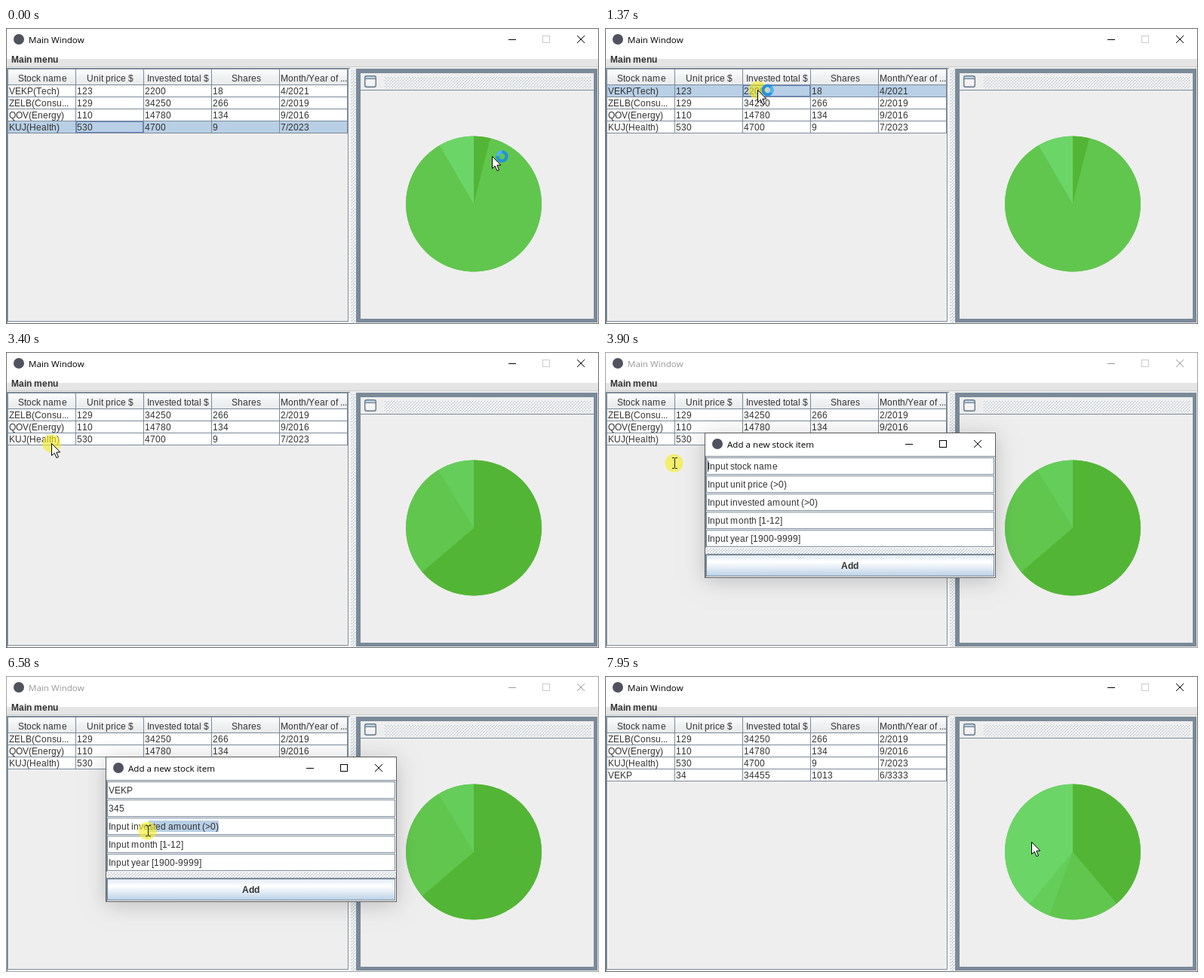
An HTML page with a canvas that plays this animation: 786 by 393 pixels, repeating every 7.99 s.

```html
<!DOCTYPE html>
<html lang="en">
<head>
<meta charset="utf-8">
<title>Main Window</title>
<style>
html, body { margin: 0; width: 100%; height: 100%; overflow: hidden; background: #eee; }
canvas { display: block; width: 786px; height: 393px; }
</style>
</head>
<body>
<canvas id="stage" width="786" height="393"></canvas>
<script>
const LOOP = 7990;
const ctx = document.getElementById('stage').getContext('2d');
const PLAIN = '12px "Liberation Sans", Arial, sans-serif';
const BOLD = 'bold ' + PLAIN;
const TITLE = '11.6px "Open Sans", "Noto Sans", sans-serif';
const LINE = '#7a8a99', PANEL = '#eeeeee', SELECT = '#b8cfe5', INK = '#333333';

const PICKED = 1040, DELETED = 2230, OPENS = 3450, CLOSES = 7130;

const stock = (name, price, total, date) =>
  ({ total, cells: [name, price, total, Math.round(total / price), date].map(String) });
const first = stock('VEKP(Tech)', 123, 2200, '4/2021');
const kept = [
  stock('ZELB(Consu...', 129, 34250, '2/2019'),
  stock('QOV(Energy)', 110, 14780, '9/2016'),
  stock('KUJ(Health)', 530, 4700, '7/2023')
];
const added = stock('VEKP', 34, 34455, '6/3333');
const headers = ['Stock name', 'Unit price $', 'Invested total $', 'Shares', 'Month/Year of ...'];
const hints = ['Input stock name', 'Input unit price (>0)', 'Input invested amount (>0)',
  'Input month [1-12]', 'Input year [1900-9999]'];

const within = (t, a, b) => t >= a && t < b;
const clamp = k => Math.min(1, Math.max(0, k));
const ease = k => (1 - Math.cos(Math.PI * k)) / 2;
const typed = (text, from, step, t) => text.slice(0, Math.floor((t - from) / step) + 1);

// Pointer story
const moves = [], presses = [];
const go = (from, to, x, y, bend = 0) => moves.push({ from, to, x, y, bend });
const press = (from, to) => presses.push([from, to]);

go(40, 260, 677, 228);
go(260, 820, 217, 104, 70);
go(840, PICKED, 202, 82);
press(PICKED, 1420);
go(1380, 1690, 312, 98);
go(1690, 1910, 281, 97);
press(2090, DELETED);
go(2530, 2850, 40, 43);
press(2850, 2950);
go(2950, 3120, 60, 121);
press(3330, 3420);
go(3420, 3680, 138, 148);
press(3700, 4090);
go(3700, 3880, 91, 147);
go(4210, 4860, 374, 184);
go(5620, 5620, 278, 180);
press(5620, 5900);
go(5640, 5860, 73, 180);
go(5920, 6390, 312, 202);
press(6420, 6860);
go(6420, 6730, 75, 207);
go(6860, 6990, 296, 284);
press(7030, CLOSES);
go(7560, 7840, 585, 210);
go(7840, 7950, 565, 220);

function pointerAt(t) {
  let x = 644, y = 170;
  for (const m of moves) {
    if (t < m.from) break;
    const k = m.to > m.from ? ease(clamp((t - m.from) / (m.to - m.from))) : 1;
    x += (m.x - x) * k;
    y += (m.y - y) * k + m.bend * Math.sin(Math.PI * k);
  }
  return [Math.round(x), Math.round(y)];
}

// Drawing helpers
function rect(x, y, w, h, fill) {
  ctx.fillStyle = fill;
  ctx.fillRect(x, y, w, h);
}

function frame(x, y, w, h, color) {
  ctx.strokeStyle = color;
  ctx.lineWidth = 1;
  ctx.strokeRect(x + 0.5, y + 0.5, w - 1, h - 1);
}

// Dark top and left edge, white bottom and right edge
function sunken(x, y, w, h) {
  frame(x, y, w, h, '#ffffff');
  rect(x, y, w, 1, LINE);
  rect(x, y, 1, h, LINE);
}

// Dark frame with a white line outside its lower right corner
function flush(x, y, w, h) {
  frame(x + 1, y + 1, w - 1, h - 1, '#ffffff');
  frame(x, y, w - 1, h - 1, LINE);
}

function disc(x, y, r, fill) {
  ctx.fillStyle = fill;
  ctx.beginPath();
  ctx.arc(x, y, r, 0, 7);
  ctx.fill();
}

function blend(y0, y1, ...colors) {
  const g = ctx.createLinearGradient(0, y0, 0, y1);
  colors.forEach((c, i) => g.addColorStop(i / (colors.length - 1), c));
  return g;
}

// Whole-pixel advances, as in hinted interface text
const advance = ch => ch === 'm' ? 11 : Math.round(ctx.measureText(ch).width);

function stopsOf(text, font = PLAIN) {
  ctx.font = font;
  const out = [0];
  for (const ch of text) out.push(out[out.length - 1] + advance(ch));
  return out;
}

function label(text, x, y, font = PLAIN) {
  const at = stopsOf(text, font);
  ctx.fillStyle = INK;
  [...text].forEach((ch, i) => ctx.fillText(ch, x + at[i], y));
}

function centered(text, cx, y, font) {
  label(text, Math.round(cx - stopsOf(text, font).pop() / 2), y, font);
}

const dots = (() => {
  const tile = document.createElement('canvas');
  tile.width = tile.height = 4;
  const c = tile.getContext('2d');
  for (const d of [0, 2]) {
    c.fillStyle = '#ffffff';
    c.fillRect(d, d, 1, 1);
    c.fillStyle = '#9aabbd';
    c.fillRect(d + 1, d + 1, 1, 1);
  }
  return ctx.createPattern(tile, 'repeat');
})();

function bumps(x, y, w, h) {
  ctx.save();
  ctx.translate(x, y);
  rect(0, 0, w, h, dots);
  ctx.restore();
}

function titleBar(x, y, w, text, active, maxColor) {
  const ink = active ? '#000000' : '#999999';
  const r = x + w, m = y + 14;
  rect(x, y, w, 30, '#ffffff');
  disc(x + 16, m, 7, '#50535f');
  ctx.font = TITLE;
  ctx.fillStyle = ink;
  ctx.fillText(text, x + 29, y + 19);
  rect(r - 119, m, 10, 1, ink);
  frame(r - 74, m - 5, 10, 10, active ? maxColor : '#cccccc');
  ctx.strokeStyle = ink;
  ctx.beginPath();
  for (const s of [-5, 5]) {
    ctx.moveTo(r - 28, m - s);
    ctx.lineTo(r - 18, m + s);
  }
  ctx.stroke();
}

// Main window
function rowsAt(t) {
  return [...(t < DELETED ? [first] : []), ...kept, ...(t >= CLOSES ? [added] : [])];
}

function table(t, rows) {
  sunken(1, 53, 455, 339);
  flush(2, 54, 453, 337);
  rect(3, 55, 450, 20, blend(55, 75, '#ffffff', '#f0f1f2', '#e9ebed'));
  rect(3, 75, 450, 1, LINE);
  headers.forEach((h, c) => {
    centered(h, 48 + c * 90, 71);
    rect(92 + c * 90, 55, 1, 20, LINE);
  });

  const picked = t < PICKED ? 3 : t < DELETED ? 0 : -1;
  const focusCol = t < PICKED ? 1 : 2;
  rows.forEach(({ cells }, r) => {
    const y = 76 + r * 16;
    rect(3, y, 450, 15, r === picked ? SELECT : '#ffffff');
    rect(3, y + 15, 450, 1, LINE);
    cells.forEach((cell, c) => {
      label(cell, 4 + c * 90, y + 12);
      rect(92 + c * 90, y, 1, 16, LINE);
    });
    if (r === picked) frame(3 + focusCol * 90, y, 89, 15, '#6382bf');
  });
}

function chartFrame() {
  rect(464, 54, 320, 337, LINE);
  rect(470, 60, 309, 326, PANEL);
  rect(470, 82, 309, 1, LINE);
  bumps(501, 64, 274, 16);
  ctx.strokeStyle = '#65778a';
  ctx.lineWidth = 1.4;
  ctx.beginPath();
  ctx.roundRect(475.7, 63.7, 14.6, 14.6, 2.5);
  ctx.stroke();
  rect(477, 65, 12, 2, SELECT);
  rect(476, 67, 14, 1, '#65778a');
  rect(477, 68, 12, 9, '#f4f4f4');
}

function pie(values, colors) {
  const cx = 620, cy = 233.5, radius = 90;
  const total = values.reduce((a, b) => a + b);
  let from = -Math.PI / 2;
  disc(cx, cy, radius, colors[1]);
  values.forEach((v, i) => {
    const to = from + v / total * Math.PI * 2;
    ctx.fillStyle = colors[i];
    ctx.beginPath();
    ctx.moveTo(cx, cy);
    ctx.arc(cx, cy, radius, from, to);
    ctx.fill();
    from = to;
  });
}

function mainWindow(t) {
  const active = t < OPENS || t >= CLOSES;
  const rows = rowsAt(t);
  rect(0, 0, 786, 393, PANEL);
  titleBar(1, 1, 784, 'Main Window', active, '#cccccc');
  rect(1, 31, 784, 10, '#ffffff');
  rect(1, 41, 784, 10, '#e5e5e5');
  rect(1, 51, 784, 1, '#cccccc');
  label('Main menu', 7, 46, BOLD);
  table(t, rows);
  bumps(457, 55, 7, 336);
  chartFrame();
  pie(rows.map(r => r.total),
    ['#53b535', '#61c64e', t < DELETED ? '#61c64e' : '#65cd5a', '#6cd567']);
  frame(0, 0, 786, 393, active ? '#6f6f6f' : '#a2a2a2');
}

// Dialog
function fieldTexts(t) {
  if (t >= 6860) return ['VEKP', '34', '34455', '6', '3333'];
  const out = [...hints];
  if (t >= 4890) out[0] = typed('VEKP', 4890, 160, t);
  if (t >= 6010) out[1] = typed('345', 6010, 80, t);
  return out;
}

// Selected field and the pointer x that bounds the selection
function selection(t, x) {
  if (within(t, 3960, 4890)) return [0, 0];
  if (within(t, 5620, 6010)) return [1, t < 5860 ? x : 0];
  if (within(t, 6420, 6860)) return [2, x];
  return [-1, 0];
}

function caretField(t) {
  if (within(t, 3600, 3960) || within(t, 4890, 5620)) return 0;
  if (within(t, 5620, 5660) || within(t, 6010, 6420)) return 1;
  return -1;
}

function field(text, i, t, x) {
  const y = 140 + i * 24, left = 136;
  const at = stopsOf(text), end = at[at.length - 1];
  const [chosen, edge] = selection(t, x);
  rect(134, y, 382, 24, '#ffffff');
  flush(134, y, 383, 24);
  if (chosen === i) {
    const gap = p => Math.abs(left + p - edge);
    const near = at.reduce((a, b) => gap(b) < gap(a) ? b : a);
    rect(left + near, y + 4, end - near, 15, SELECT);
  }
  label(text, left, y + 16);
  if (caretField(t) === i) rect(left + (t < 3960 ? 0 : end), y + 4, 1, 15, INK);
}

function dialog(t, x) {
  ctx.save();
  ctx.shadowColor = 'rgba(0,0,0,0.2)';
  ctx.shadowBlur = 26;
  ctx.shadowOffsetY = 4;
  rect(132, 107, 386, 193, PANEL);
  ctx.restore();
  titleBar(133, 108, 384, 'Add a new stock item', true, '#000000');
  sunken(133, 138, 384, 122);
  fieldTexts(t).forEach((text, i) => field(text, i, t, x));
  bumps(134, 260, 382, 8);
  sunken(133, 268, 384, 31);
  const pressed = within(t, 7030, CLOSES);
  rect(134, 269, 382, 29, pressed ? SELECT
    : blend(269, 298, '#dde8f3', '#ffffff', '#dde8f3', '#b8cfe5'));
  frame(134, 269, 382, 29, LINE);
  centered('Add', 324, 288, BOLD);
  frame(132, 107, 386, 193, '#5c5c5c');
}

function dialogLayer(t, x) {
  const k = clamp(Math.min((t - OPENS) / 180, (CLOSES + 150 - t) / 150));
  if (!k) return;
  const scale = 0.9 + 0.1 * (1 - (1 - k) ** 2);
  ctx.save();
  ctx.globalAlpha = k;
  ctx.translate(325 * (1 - scale), 203.5 * (1 - scale));
  ctx.scale(scale, scale);
  dialog(t, x);
  ctx.restore();
}

// Pointer shapes
function arrow() {
  ctx.translate(0.5, 0.5);
  ctx.fillStyle = '#ffffff';
  ctx.strokeStyle = '#000000';
  ctx.lineWidth = 1;
  const shape = new Path2D('M0 0V16L3.7 12.7L6.5 19L9 18L6.3 11.7L11.3 11.5Z');
  ctx.fill(shape);
  ctx.stroke(shape);
}

function beam() {
  rect(1, -6, 1, 13, '#222222');
  for (const y of [-7, 7]) {
    rect(-2, y, 3, 1, '#222222');
    rect(2, y, 3, 1, '#222222');
  }
}

function busyRing(t) {
  const turn = t / 160 + 3.2;
  ctx.lineWidth = 4.2;
  for (const [color, sweep] of [['#2490e0', 7], ['#52b4ee', 1.5]]) {
    ctx.strokeStyle = color;
    ctx.beginPath();
    ctx.arc(13.5, 0.5, 6, turn, turn + sweep);
    ctx.stroke();
  }
}

function pointer(t, x, y) {
  ctx.save();
  ctx.translate(x, y);
  if (presses.some(([a, b]) => within(t, a, b))) disc(0.5, 0.5, 12, 'rgba(245,238,30,0.62)');
  if (t < 1800) busyRing(t);
  if (within(t, 3660, 6860)) beam();
  else arrow();
  ctx.restore();
}

let start;
function draw(now) {
  start ??= now;
  const t = (now - start) % LOOP;
  const [x, y] = pointerAt(t);
  mainWindow(t);
  dialogLayer(t, x);
  pointer(t, x, y);
  requestAnimationFrame(draw);
}
requestAnimationFrame(draw);
</script>
</body>
</html>
```
